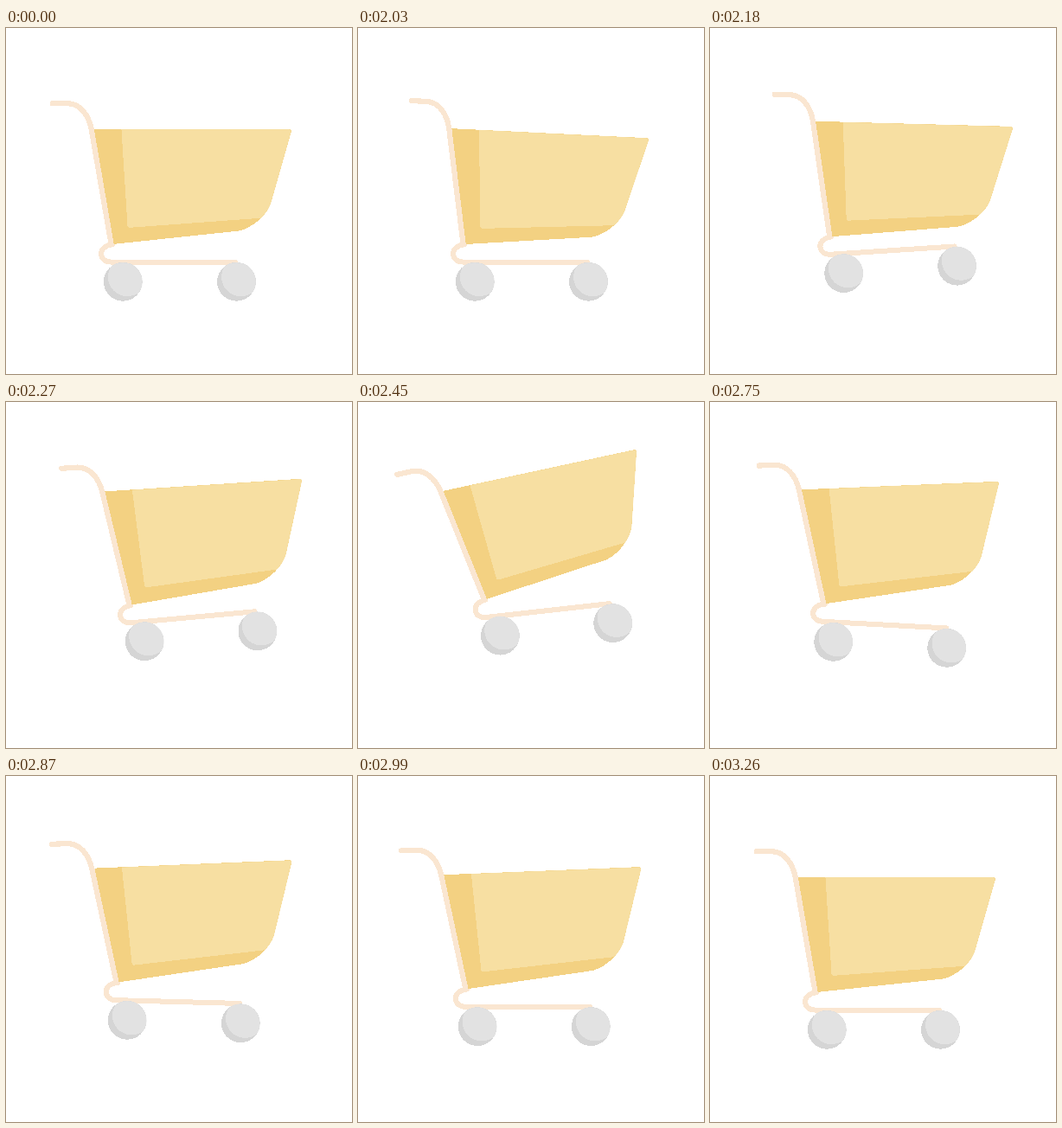
An HTML page that plays this animation: 400x400 px, repeating every 3320 ms.

```html
<!DOCTYPE html>
<html lang="en">
<head>
<meta charset="utf-8">
<title>Hopping cart</title>
<style>
  html, body { margin: 0; width: 100%; height: 100%; overflow: hidden; background: #fff; }
  svg { display: block; width: 100%; height: 100%; shape-rendering: crispEdges; }
</style>
</head>
<body>
<svg viewBox="0 0 400 400">
  <defs>
    <path id="shape" d="M100.5 117H327Q330.4 117 329.5 120.6L306 203C301.5 216 286 230.5 269.5 234.5L123 250Z"/>
    <clipPath id="inside"><use href="#shape"/></clipPath>
    <clipPath id="rim"><circle r="22.4"/></clipPath>
    <g id="wheel">
      <circle r="22.4" fill="#d5d5d5"/>
      <circle cx="5" cy="-5.5" r="22.4" fill="#e2e2e2" clip-path="url(#rim)"/>
    </g>
  </defs>
  <g id="base">
    <path d="M123 250.3C115 251 110 255.5 110 261S115 270.5 121 270.5H265" fill="none" stroke="#fae6d1" stroke-width="6" stroke-linecap="round"/>
    <use href="#wheel" x="135.3" y="293.3"/>
    <use href="#wheel" x="266.5" y="293.3"/>
  </g>
  <g id="basket">
    <use href="#shape" fill="#f3d182"/>
    <path d="M133 110L140.5 229Q140.7 231 143 230.8L340 216.4V110Z" fill="#f7dfa2" clip-path="url(#inside)"/>
    <path d="M53.7 87.2H71C86 87.2 95.7 101 98.7 117L121.7 250.5" fill="none" stroke="#fae6d1" stroke-width="6.2"/>
    <circle cx="53.7" cy="87.2" r="3.1" fill="#fae6d1"/>
  </g>
</svg>
<script>
const LOOP = 3320, STEP = 30;
const AXLE = [135.3, 293.3], HINGE = [122, 250];

// Key poses: time, base x, base y, base angle, basket angle
const POSES = [
  [2030, 0, 0, 0, 2.8],
  [2180, 19.4, -9.7, -3.7, 1.55],
  [2420, 29.6, -24.4, -6.6, -13.4],
  [2610, 17.5, -6, -1, 5],
  [2750, 7.4, -16, 3.05, -2.4],
  [2990, 2.8, -3.7, 0, -2.3],
  [3110, 0, 0, 0, 0]
];
const START = POSES[0][0], LAST = POSES.length - 1, END = POSES[LAST][0];

const rate = (i, c) => (POSES[i + 1][c] - POSES[i][c]) / (POSES[i + 1][0] - POSES[i][0]);

// Speed through a pose: zero at turning points and at the end
function speed(i, c) {
  if (i === 0) return rate(0, c);
  if (i === LAST) return 0;
  const a = rate(i - 1, c), b = rate(i, c);
  return a * b > 0 ? 2 * a * b / (a + b) : 0;
}

function value(t, c) {
  const i = POSES.findLastIndex(p => p[0] <= t);
  const h = POSES[i + 1][0] - POSES[i][0], u = (t - POSES[i][0]) / h, w = 1 - u;
  return POSES[i][c] * w * w * (1 + 2 * u) + POSES[i + 1][c] * u * u * (3 - 2 * u)
    + h * u * w * (speed(i, c) * w - speed(i + 1, c) * u);
}

const base = document.getElementById("base");
const basket = document.getElementById("basket");

function pose(x, y, lean, tilt) {
  const r = lean * Math.PI / 180, s = Math.sin(r), c = Math.cos(r);
  const dx = HINGE[0] - AXLE[0], dy = HINGE[1] - AXLE[1];
  const hx = x + dx * c - dy * s - dx, hy = y + dx * s + dy * c - dy;
  base.setAttribute("transform", `translate(${x} ${y}) rotate(${lean} ${AXLE})`);
  basket.setAttribute("transform", `translate(${hx} ${hy}) rotate(${tilt} ${HINGE})`);
}

function draw(ms) {
  const t = ms % LOOP;
  if (t < START || t >= END) return pose(0, 0, 0, 0);
  const q = START + Math.floor((t - START) / STEP) * STEP;
  pose(...[1, 2, 3, 4].map(c => value(q, c)));
}

const begin = performance.now();
function tick() {
  draw(performance.now() - begin);
  requestAnimationFrame(tick);
}
tick();
</script>
</body>
</html>
```
